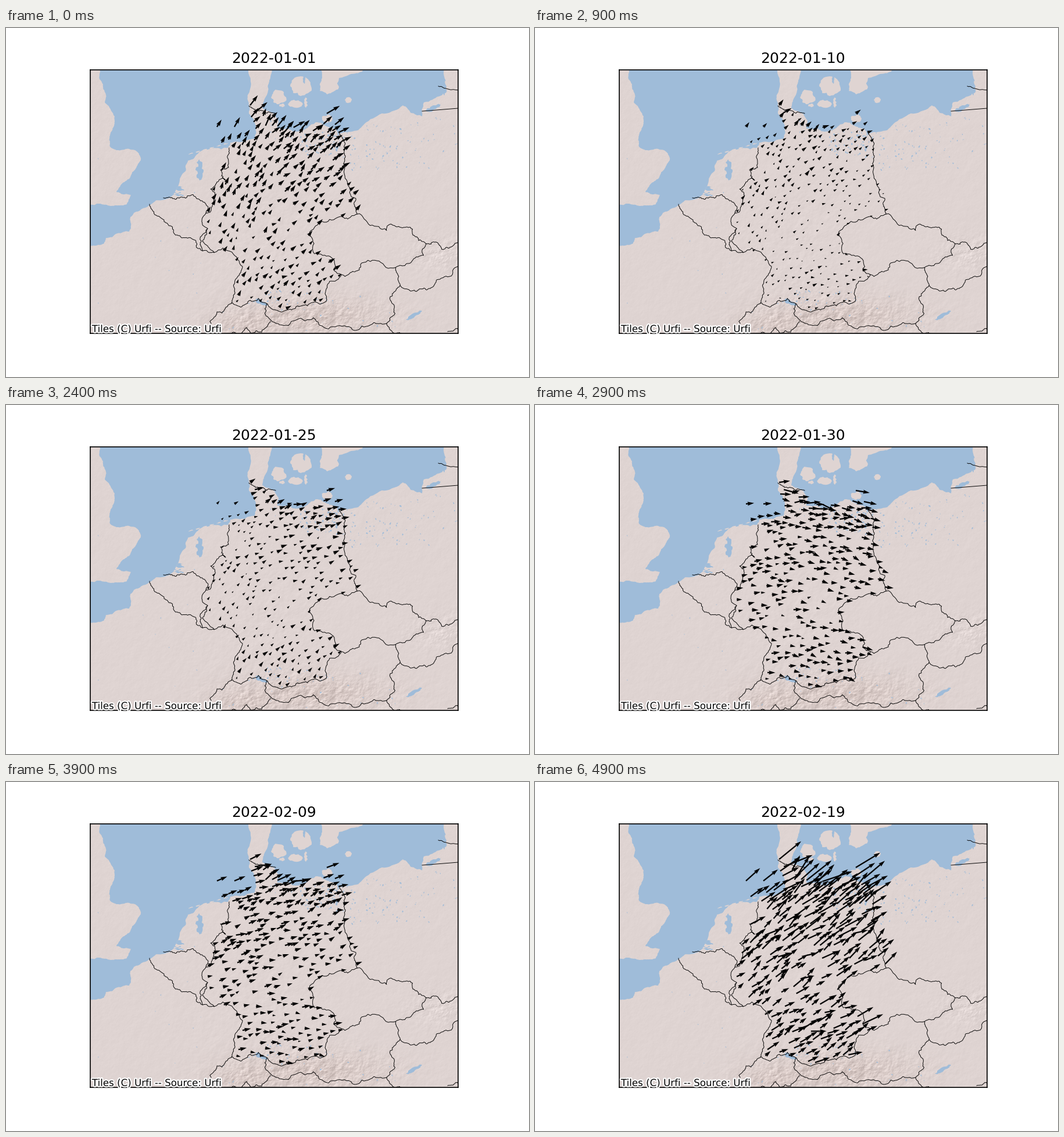
Animation, 900 px wide and 600 px high, one loop 5 s. Source, as a matplotlib script:

```python
import numpy as np
import matplotlib.pyplot as plt
from matplotlib.animation import FuncAnimation
from matplotlib.path import Path
from matplotlib.patheffects import withStroke

WIDTH, HEIGHT, DPI = 900, 600, 150
LEFT, RIGHT, TOP, BOTTOM = 144.75, 777.75, 72, 525
FRAMES, INTERVAL = 50, 100
SEA, LAND = "#9fbcd9", "#dfd4d2"

rng = np.random.default_rng(12)
fig = plt.figure(figsize=(WIDTH / DPI, HEIGHT / DPI), dpi=DPI, facecolor="white")
ax = fig.add_axes([LEFT / WIDTH, 1 - BOTTOM / HEIGHT,
                   (RIGHT - LEFT) / WIDTH, (BOTTOM - TOP) / HEIGHT])
ax.set_xticks([])
ax.set_yticks([])


def roughen(points, sway, levels=4):
    """Break each segment into a wiggly line by midpoint displacement."""
    points = np.array(points, float)
    for _ in range(levels):
        step = np.diff(points, axis=0)
        normal = step[:, ::-1] * [-1, 1]
        middle = points[:-1] + step / 2 + normal * rng.normal(0, sway, (len(step), 1))
        merged = np.empty((2 * len(points) - 1, 2))
        merged[::2], merged[1::2] = points, middle
        points = merged
    return points


def area(points, color, sway=0.07):
    ax.fill(*roughen(points, sway).T, color=color, lw=0, zorder=2)


def blob(x, y, rx, ry, color=LAND, tilt=0.0):
    """Ragged ellipse: an island or a lake."""
    a = np.linspace(0, 2 * np.pi, 9)
    ring = np.column_stack([x + rx * np.cos(a), y + ry * np.sin(a) + tilt * rx * np.cos(a)])
    ax.fill(*roughen(ring, 0.15, 2).T, color=color, lw=0, zorder=2)


def lakes(count, x0, x1, y0, y1, size):
    for _ in range(count):
        x, y = rng.uniform([x0, y0], [x1, y1])
        blob(x, y, *rng.uniform(0.4, size, 2), SEA, rng.uniform(-1, 1))


def border(points, sway=0.13):
    ax.plot(*roughen(points, sway).T, color="black", lw=0.45, zorder=3)


def relief():
    """Hill-shaded noise, strong in the mountains and faint elsewhere."""
    h, w = BOTTOM - TOP, int(RIGHT - LEFT)
    freq = np.hypot(np.fft.fftfreq(h)[:, None], np.fft.rfftfreq(w)[None]) + 0.02
    spectrum = np.fft.rfft2(rng.normal(size=(h, w))) / freq ** 1.9
    dy, dx = np.gradient(np.fft.irfft2(spectrum, s=(h, w)))
    shade = dx + dy
    shade = np.clip(shade / shade.std(), -2.5, 2.5)
    y, x = np.mgrid[TOP:BOTTOM, LEFT:RIGHT - 0.5]

    def bump(cx, cy, sx, sy):
        return np.exp(-((x - cx) / sx) ** 2 - ((y - cy) / sy) ** 2)

    alps = np.clip(bump(530, 497, 120, 36) + 0.6 * bump(400, 512, 55, 26), 0, 1)
    hills = 0.5 * bump(745, 388, 55, 28) + 0.12 * bump(440, 370, 110, 100)
    image = [223, 212, 210] + (shade * (1 + 11 * np.clip(alps + hills, 0, 1)))[..., None]
    image -= alps[..., None] * [7, 11, 13]
    return np.clip(image, 0, 240) / 255


ax.imshow(relief(), extent=(LEFT, RIGHT, BOTTOM, TOP), aspect="auto", zorder=1)

# North Sea with the Channel, then the Baltic
area([(158, 40), (161, 88), (170, 128), (187, 152), (186, 168), (178, 190), (179, 204),
      (190, 210), (212, 208), (226, 213), (232, 227), (214, 256), (190, 282), (215, 287),
      (208, 303), (175, 305), (145, 304), (125, 304), (125, 374), (150, 374), (168, 371),
      (172, 361), (212, 350), (214, 325), (245, 306), (284, 290), (309, 246), (313, 228),
      (335, 212), (382, 206), (386, 197), (410, 196), (428, 190), (430, 168), (418, 147),
      (416, 115), (413, 40)], SEA)
area([(462, 40), (453, 90), (446, 120), (441, 138), (462, 148), (467, 173), (503, 178),
      (533, 162), (557, 172), (575, 181), (620, 162), (683, 133), (697, 146), (716, 152),
      (719, 128), (751, 115), (756, 101), (743, 40)], SEA)

# Southern Sweden and the islands
area([(538, 50), (544, 85), (540, 108), (553, 114), (572, 105), (573, 86), (613, 75),
      (614, 50)], LAND)
for x, y, rx, ry in [(469, 119, 13, 12), (507, 100, 18, 17), (498, 131, 13, 6),
                     (516, 128, 3, 9), (589, 124, 6, 5), (553, 156, 9, 7), (475, 133, 5, 3)]:
    blob(x, y, rx, ry)
blob(513, 88, 2, 8, SEA)
for x in range(318, 380, 12):
    blob(x, 216 - (x - 318) * 0.28, 4, 1, tilt=-0.3)

# Inland water
blob(333, 244, 7, 18, SEA)
for row in range(4):
    blob(290 + 4 * (row % 2), 272 + 5 * row, 13, 1.3, SEA, 0.1)
blob(439, 472, 13, 3, SEA, 0.4)
blob(702, 494, 14, 4, SEA, -0.55)
blob(735, 137, 13, 4, SEA, -0.4)
blob(754, 101, 4, 15, SEA)
for region in [(60, 505, 575, 178, 222, 2), (70, 580, 690, 165, 245, 1.6),
               (25, 690, 778, 145, 245, 1.5), (35, 440, 565, 452, 476, 1.6),
               (20, 455, 520, 140, 195, 1.5), (22, 370, 670, 460, 522, 1.6),
               (14, 145, 345, 200, 500, 1)]:
    lakes(*region)

# Land frontiers
germany = [(384, 206), (383, 240), (369, 244), (378, 262), (352, 277), (355, 305),
           (344, 318), (347, 345), (338, 367), (358, 386), (407, 410), (393, 440),
           (388, 473), (418, 469), (449, 474), (470, 487), (507, 478), (551, 470),
           (549, 457), (577, 424), (545, 391), (523, 350), (570, 326), (604, 320),
           (602, 293), (583, 240), (582, 205), (574, 180)]
border(germany)
border([(418, 134), (440, 142), (464, 147)])
border([(271, 292), (300, 291), (333, 295), (348, 308), (344, 318)])
border([(247, 303), (272, 333), (290, 354), (326, 365), (338, 383), (358, 386)])
border([(347, 345), (336, 366), (338, 383)])
border([(604, 320), (655, 348), (662, 337), (690, 342), (700, 356), (723, 371)])
border([(577, 424), (608, 416), (612, 404), (670, 412), (700, 399), (723, 371),
        (740, 368), (752, 381), (778, 369)])
border([(670, 412), (678, 443), (706, 453), (730, 448), (741, 433), (778, 410)])
border([(678, 443), (661, 462), (665, 474), (655, 508), (660, 518), (680, 525)])
border([(655, 508), (600, 520), (540, 511), (529, 498), (470, 510), (446, 492), (449, 474)])
border([(388, 473), (363, 488), (349, 525)])
border([(388, 525), (414, 515), (421, 524), (440, 523), (455, 504)])
border([(760, 522), (779, 518)])
border([(716, 143), (778, 138)], 0)
border([(744, 100), (779, 107)], 0.06)

# Weather stations: a few at sea and on summits, the rest scattered, denser near the coast
offshore = [(363, 170), (371, 197), (383, 192), (393, 170), (398, 190), (411, 186),
            (420, 133), (422, 153), (552, 147), (566, 166)]
summits = [(480, 281), (555, 403), (400, 460), (407, 427)]
north_coast = [(553, 160), (520, 172), (480, 170), (452, 145), (422, 142), (428, 190),
               (405, 200)]
country = Path(germany + north_coast)

stations = offshore + summits
while len(stations) < 280:
    spots = rng.uniform([345, 135], [606, 485], (40, 2))
    spots = spots[country.contains_points(spots)]
    gaps = np.linalg.norm(spots[:, None] - stations, axis=2).min(axis=1)
    score = np.minimum(gaps, 9) + rng.random(len(gaps)) + 0.3 * (spots[:, 1] < 215)
    stations.append(spots[score.argmax()])
sx, sy = np.array(stations).T

exposure = np.exp(rng.normal(0, 0.22, len(sx)) + 1j * rng.normal(0, 0.14, len(sx)))
exposure[:len(offshore)] = 1
exposure[len(offshore):len(offshore) + len(summits)] = 1.4
exposure *= 1 + 0.85 * np.exp(-((sy - 130) / 50) ** 2)
east = (sx - 370) / 220
south = np.clip((sy - 230) / 220, 0, 1)

# Inland wind in pixels, right + up * j, at the NW, NE, SW and SE corners
KEY_WINDS = {
    0: (5 + 10j, 12 + 8j, 4 + 6j, 6 + 5j),
    9: (4 + 5j, 5 + 3j, 3 + 3j, 5),
    16: (12 + 1j, 23 + 2j, 10 + 6j, 18 + 6j),
    24: (4 + 3j, 10 + 2j, 3 + 6j, 5 + 4j),
    35: (10 + 13j, 15 + 11j, 10 + 7j, 14 + 6j),
    44: (8 + 15j, -1 + 14j, 8 + 11j, 1 + 5j),
    49: (18 + 14j, 24 + 17j, 13 + 10j, 18 + 9j),
}


def wind(day):
    """Complex wind at every station, with a seeded change of weather between key days."""
    days = list(KEY_WINDS)
    nw, ne, sw, se = (np.interp(day, days, corner) for corner in zip(*KEY_WINDS.values()))
    flow = (1 - south) * (nw + (ne - nw) * east) + south * (sw + (se - sw) * east)
    daily = np.random.default_rng(100 + day)
    unsettled = min(1, min(abs(day - key) for key in days) / 4)
    flow = flow * exposure * np.exp(unsettled * (0.25 * daily.normal() + 0.4j * daily.normal()))
    gusts = daily.normal(size=len(sx)) + 1j * daily.normal(size=len(sx))
    return flow + gusts * (0.6 + 0.04 * abs(flow))


arrows = ax.quiver(sx, sy, 0 * sx, 0 * sy, color="black", units="width", width=0.0036,
                   scale=RIGHT - LEFT, scale_units="width", zorder=4)
ax.text(0.005, 0.005, "Tiles (C) Urfi -- Source: Urfi", transform=ax.transAxes, size=8,
        path_effects=[withStroke(linewidth=2, foreground="w")], zorder=5)
title = ax.set_title("", fontsize=12)
ax.set_xlim(LEFT, RIGHT)
ax.set_ylim(BOTTOM, TOP)


def update(day):
    flow = wind(day)
    arrows.set_UVC(flow.real, flow.imag)
    title.set_text(str(np.datetime64("2022-01-01") + day))
    return arrows, title


animation = FuncAnimation(fig, update, frames=FRAMES, interval=INTERVAL, repeat=True)
plt.show()
```
